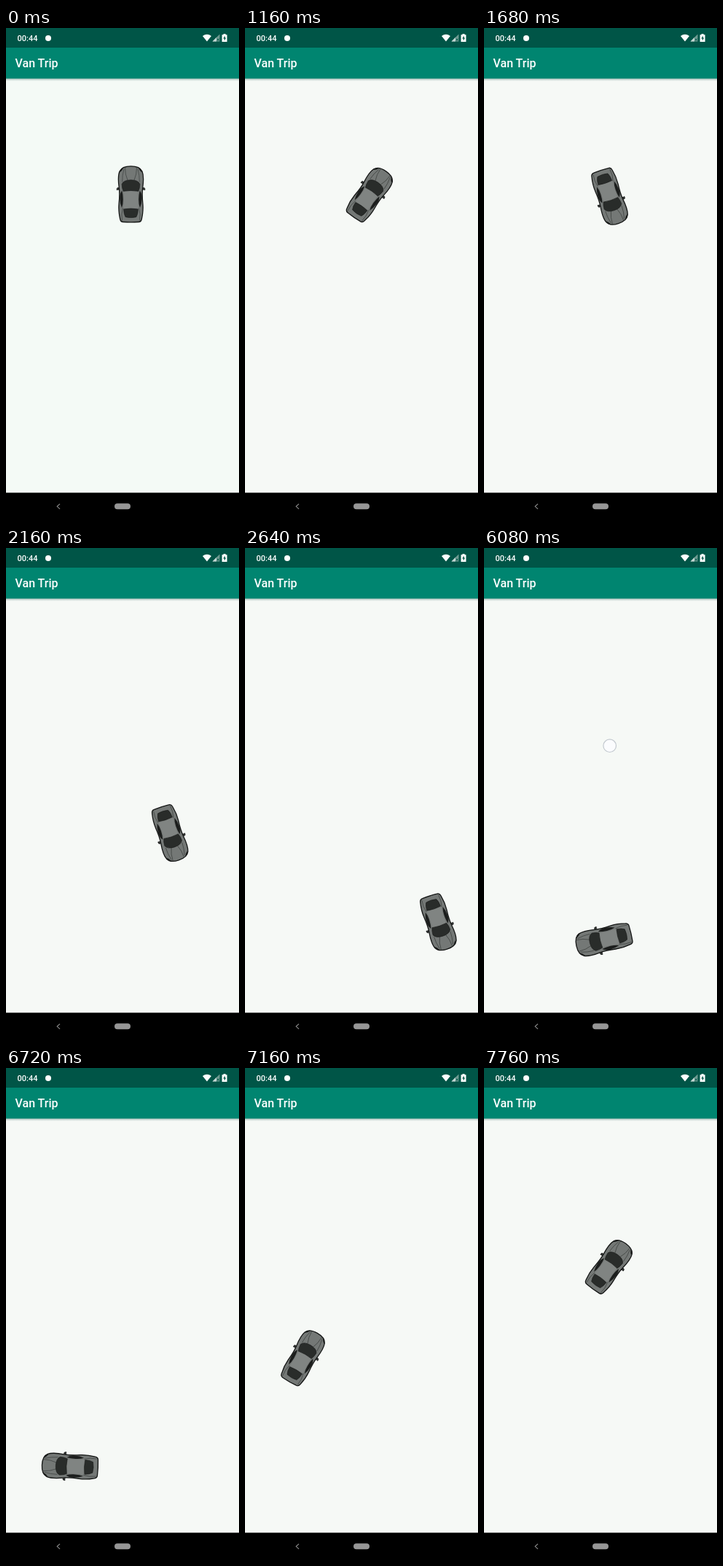
Write an HTML page that moves like this. It is 320 by 676 pixels and loops after 7960 ms.

```html
<!DOCTYPE html>
<html lang="en">
<head>
<meta charset="utf-8">
<title>Van Trip</title>
<style>
  html, body { margin: 0; width: 100%; height: 100%; overflow: hidden; background: #f6f9f6; }
  svg { display: block; width: 100%; height: 100%; }
  text { font-family: Roboto, "Noto Sans", sans-serif; font-weight: 500; fill: #fff; }
</style>
</head>
<body>
<svg viewBox="0 0 320 676" xmlns="http://www.w3.org/2000/svg">
  <defs>
    <linearGradient id="shade" x1="0" y1="0" x2="0" y2="1">
      <stop offset="0" stop-color="#a9bdb8"/>
      <stop offset="1" stop-color="#a9bdb8" stop-opacity="0"/>
    </linearGradient>
    <g id="side">
      <path d="M15.6-8.5 L18-9.2 Q19.6-9 19.4-6 L17.2-6.4 L15.4-5.5Z" fill="#333634" stroke="#101211" stroke-width=".7"/>
    </g>
    <g id="trim">
      <path d="M10-37 Q14.6-35 15.4-30 Q11.8-32.4 10-37Z" fill="#181a19"/>
      <path d="M12.2-5 Q15.6-1 15.2 6 Q15 13 12.5 18.5 Q10.6 14 10.7 7 Q10.8 0 12.2-5Z" fill="#1b1d1c"/>
      <path d="M8-37 Q8-27 4.5-19.5 M9.5-35 Q12-26 11.8-17 M11 19 Q13.6 27 12 36" fill="none" stroke="#3c403e" stroke-width=".7"/>
    </g>
  </defs>

  <rect id="page" width="320" height="676"/>
  <rect y="69" width="320" height="4" fill="url(#shade)"/>
  <rect y="26" width="320" height="43.5" fill="#008570"/>
  <rect width="320" height="27" fill="#005547"/>
  <text x="12.5" y="54.3" font-size="16">Van Trip</text>

  <text x="15.5" y="17.8" font-size="11">00:44</text>
  <circle cx="58" cy="14" r="4" fill="#fff"/>
  <path d="M270 11 Q276 6.6 282 11 L276 18.5Z" fill="#fff"/>
  <path d="M293.5 8.5 V18.5 H283.5Z" fill="#6f9b92"/>
  <path d="M289 13 V18.5 H283.5Z" fill="#c5d8d4"/>
  <path d="M289.8 14.5 l3 3 m0-3 l-3 3" stroke="#005547" stroke-width="1"/>
  <path d="M298.6 9.2 V8 h3 v1.2 H303.6 V19 H296.6 V9.2Z" fill="#fff"/>
  <path d="M300.8 10.8 L298.2 14.6 H299.8 V17.4 L302.2 13.4 H300.8Z" fill="#005547"/>

  <path id="curve" d="M164.5 538 Q-94 599 172 272.5" fill="none"/>
  <circle id="tap" r="8.8" fill="#fbfcfe" stroke="#c3c9cf" stroke-width="1.2"/>

  <g id="car">
    <use href="#side"/><use href="#side" transform="scale(-1 1)"/>
    <path d="M0-38.6 C8-38.6 13-37 15.5-31.5 C17.8-26 17.3-17 16.2-9 C15.3-2 15.6 5 16.4 13 C17 20 16.4 27 14.8 34 C14.2 37 13 38 10.5 38 Q0 38.8-10.5 38 C-13 38-14.2 37-14.8 34 C-16.4 27-17 20-16.4 13 C-15.6 5-15.3-2-16.2-9 C-17.3-17-17.8-26-15.5-31.5 C-13-37-8-38.6 0-38.6Z" fill="#747876" stroke="#141615" stroke-width="1.3"/>
    <use href="#trim"/><use href="#trim" transform="scale(-1 1)"/>
    <path d="M-10-4.5 Q0-6.5 10-4.5 Q9.2 8 10.5 19 H-10.5 Q-9.2 8-10-4.5Z" fill="#808482"/>
    <path d="M-12.4-14 Q-10-19.6 0-19.7 Q10-19.6 12.4-14 Q12.2-8 10.3-4.2 Q0-6-10.3-4.2 Q-12.2-8-12.4-14Z" fill="#292c2a" stroke="#171918" stroke-width=".6"/>
    <path d="M-9.8 20.4 Q0 18.7 9.8 20.4 Q9.8 27 7.4 31.2 Q0 33-7.4 31.2 Q-9.8 27-9.8 20.4Z" fill="#292c2a" stroke="#171918" stroke-width=".6"/>
  </g>

  <rect y="638.5" width="320" height="37.5" fill="#000"/>
  <path d="M74 653.8 L70.2 657.3 L74 660.8" fill="none" stroke="#8e8e8e" stroke-width="1.1"/>
  <rect x="149" y="653.2" width="22" height="8" rx="4" fill="#969696"/>
</svg>
<script>
const LOOP = 7960, STEP = 40, FADE = 200;
const $ = id => document.getElementById(id);
const car = $("car"), tap = $("tap"), page = $("page"), curve = $("curve");
const curveLength = curve.getTotalLength();

const home = { x: 171.5, y: 228.5 };
const right = { x: 265.5, y: 514.5 };
const low = { x: 164.5, y: 538 };
const goal = { x: 172.7, y: 271.7 };

const taps = [
  { at: right, down: 840, up: 940 },
  { at: low, down: 3640, up: 3790 },
  { at: goal, down: 6080, up: 6140 }
];

const clamp = v => Math.min(1, Math.max(0, v));
const mix = (a, b, k) => a + (b - a) * k;
const ease = (t, from, to) => 0.5 - 0.5 * Math.cos(Math.PI * clamp((t - from) / (to - from)));
const heading = (a, b) => Math.atan2(b.x - a.x, a.y - b.y) * 180 / Math.PI;

const turn1 = heading(home, right);
const turn2 = heading(right, low) + 360;

// Turn on the spot, then drive straight to the tapped point.
function straight(t, a, b, angleA, angleB, turnAt, goAt, endAt) {
  const k = ease(t, goAt, endAt);
  return {
    x: mix(a.x, b.x, k),
    y: mix(a.y, b.y, k),
    angle: mix(angleA, angleB, ease(t, turnAt, goAt))
  };
}

// Follow the curve, the nose trailing its tangent slightly.
function bend(t) {
  const k = ease(t, 6315, 7757), s = k * curveLength;
  const p = curve.getPointAtLength(s);
  const a = curve.getPointAtLength(Math.max(0, s - 1));
  const b = curve.getPointAtLength(Math.min(curveLength, s + 1));
  return { x: p.x, y: p.y, angle: heading(a, b) - 3 * k };
}

function pose(t) {
  if (t < 3640) return straight(t, home, right, 0, turn1, 960, 1610, 2617);
  if (t < 6080) return straight(t, right, low, turn1, turn2, 3800, 4200, 4576);
  return bend(t);
}

function draw(t) {
  const p = pose(t);
  car.setAttribute("transform", `translate(${p.x} ${p.y}) rotate(${p.angle})`);
  page.setAttribute("fill", t < 840 ? "#f4faf6" : "#f6f9f6");

  const touch = taps.find(q => t >= q.down && t < q.up + FADE);
  tap.setAttribute("opacity", touch ? 1 - clamp((t - touch.up) / FADE) : 0);
  if (touch) tap.setAttribute("transform", `translate(${touch.at.x} ${touch.at.y})`);
}

const start = performance.now();
function tick() {
  const t = (performance.now() - start) % LOOP;
  draw(Math.floor(t / STEP) * STEP);
  requestAnimationFrame(tick);
}
tick();
</script>
</body>
</html>
```
